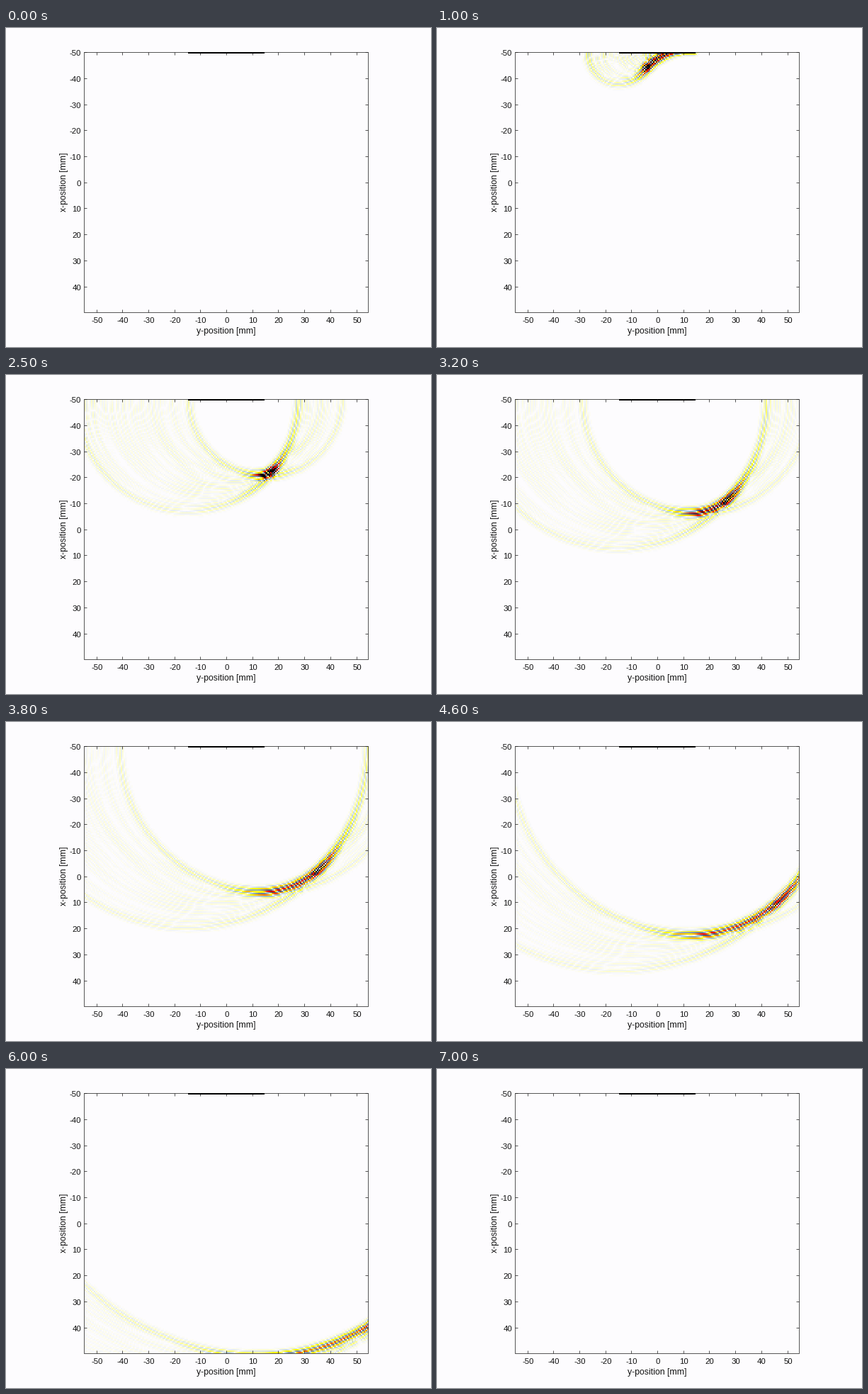
Recreate the animation shown at these times as a matplotlib script. Size 600 px wide and 450 px high, loop 7.2 s.

```python
import matplotlib as mpl
import matplotlib.pyplot as plt
import numpy as np
from matplotlib.animation import FuncAnimation
from matplotlib.colors import ListedColormap
from matplotlib.patches import Rectangle

W, H, DPI = 600, 450, 100
FRAMES, INTERVAL = 72, 100
PAPER = np.array([253, 252, 254]) / 255
INK = "#262626"
LEFT, RIGHT, TOP, BOTTOM = 110.5, 511.5, 34.5, 401.5
SCALE = 3.67             # pixels per mm
X0, Y0 = 311.5, 218.2    # pixel position of 0 mm

# Grid and array geometry, in mm
CELL = 0.5
ROWS, COLS = 200, 219
SPEED = 2.055            # travel per frame
START, END = 4.1, 70     # frames between which the wave is shown
WAVELENGTH = 1.25
SIGMA = 1.05             # pulse envelope width
PULSE_LAG = 0.3          # pulse centre behind its leading edge
FOCUS, STEER = 25.0, np.radians(30)
DELAY_STEP = 0.06

depth = (np.arange(ROWS) * CELL + 0.05)[:, None]
across = (-54.7 + np.arange(COLS) * CELL)[None, :]
elements = np.arange(-15, 14.6, CELL)
to_focus = np.hypot(FOCUS * np.sin(STEER) - elements, FOCUS * np.cos(STEER))
delays = np.round((to_focus.max() - to_focus) / DELAY_STEP) * DELAY_STEP
distances = [np.hypot(across - e, depth).astype(np.float32) for e in elements]
spreads = [1 / np.sqrt(np.maximum(d, CELL)) for d in distances]


def pressure(frame):
    """Sum the delayed tone bursts of all array elements."""
    total = np.zeros((ROWS, COLS), np.float32)
    if not START <= frame < END:
        return total
    travel = SPEED * (frame - START) - PULSE_LAG
    for delay, dist, spread in zip(delays, distances, spreads):
        s = np.clip(np.float32(travel - delay) - dist, -6, 6)
        burst = np.exp(-0.5 * (s / SIGMA) ** 2)
        total += spread * burst * np.sin(2 * np.pi / WAVELENGTH * s)
    return total


reference = np.abs(pressure(38)).max()


def display(frame):
    p = pressure(frame) / reference
    return np.sign(p) * np.abs(p) ** 0.72


def wave_colors():
    t = np.linspace(0, 1, 128)
    both = np.vstack([mpl.colormaps["bone"](t), mpl.colormaps["hot_r"](t)])
    return ListedColormap(both[:, :3] * PAPER)


fig = plt.figure(figsize=(W / DPI, H / DPI), dpi=DPI, facecolor=PAPER)
ax = fig.add_axes([0, 0, 1, 1])
ax.axis("off")
image = ax.imshow(np.zeros((ROWS, COLS)), cmap=wave_colors(), vmin=-1, vmax=1,
                  extent=(LEFT, RIGHT, BOTTOM, TOP), aspect="auto",
                  interpolation="nearest")
ax.set_xlim(0, W)
ax.set_ylim(H, 0)


def line(xs, ys):
    ax.plot(xs, ys, color=INK, lw=0.55, solid_capstyle="butt", snap=False)


def pixel_centre(v):
    return np.floor(v) + 0.5


def label(x, y, text, px, va="center_baseline", **kw):
    ax.text(x, y, text, fontsize=px * 72 / DPI, family="Liberation Sans",
            color="#111111", va=va, **kw)


line([LEFT, RIGHT, RIGHT, LEFT, LEFT], [TOP, TOP, BOTTOM, BOTTOM, TOP])
TICK = 4
for v in range(-50, 51, 10):
    x = pixel_centre(X0 + v * SCALE)
    line([x, x], [BOTTOM, BOTTOM - TICK])
    line([x, x], [TOP, TOP + TICK])
    label(x, 412, str(v), 11.4, ha="center")
for v in range(-50, 41, 10):
    y = pixel_centre(Y0 + v * SCALE)
    line([LEFT, LEFT + TICK], [y, y])
    line([RIGHT, RIGHT - TICK], [y, y])
    label(106, y + 0.5, str(v), 11.4, ha="right")
label(311, 427, "y-position [mm]", 12.2, ha="center")
label(81.5, 217, "x-position [mm]", 12.2, va="center", ha="center", rotation=90)

# Transducer array
ax.add_patch(Rectangle((256.5, 34), 108.5, 1.8, color="black", lw=0, zorder=5))


def update(frame):
    image.set_data(display(frame))
    return (image,)


anim = FuncAnimation(fig, update, frames=FRAMES, interval=INTERVAL,
                     repeat=True, repeat_delay=0, blit=False)
plt.show()
```
